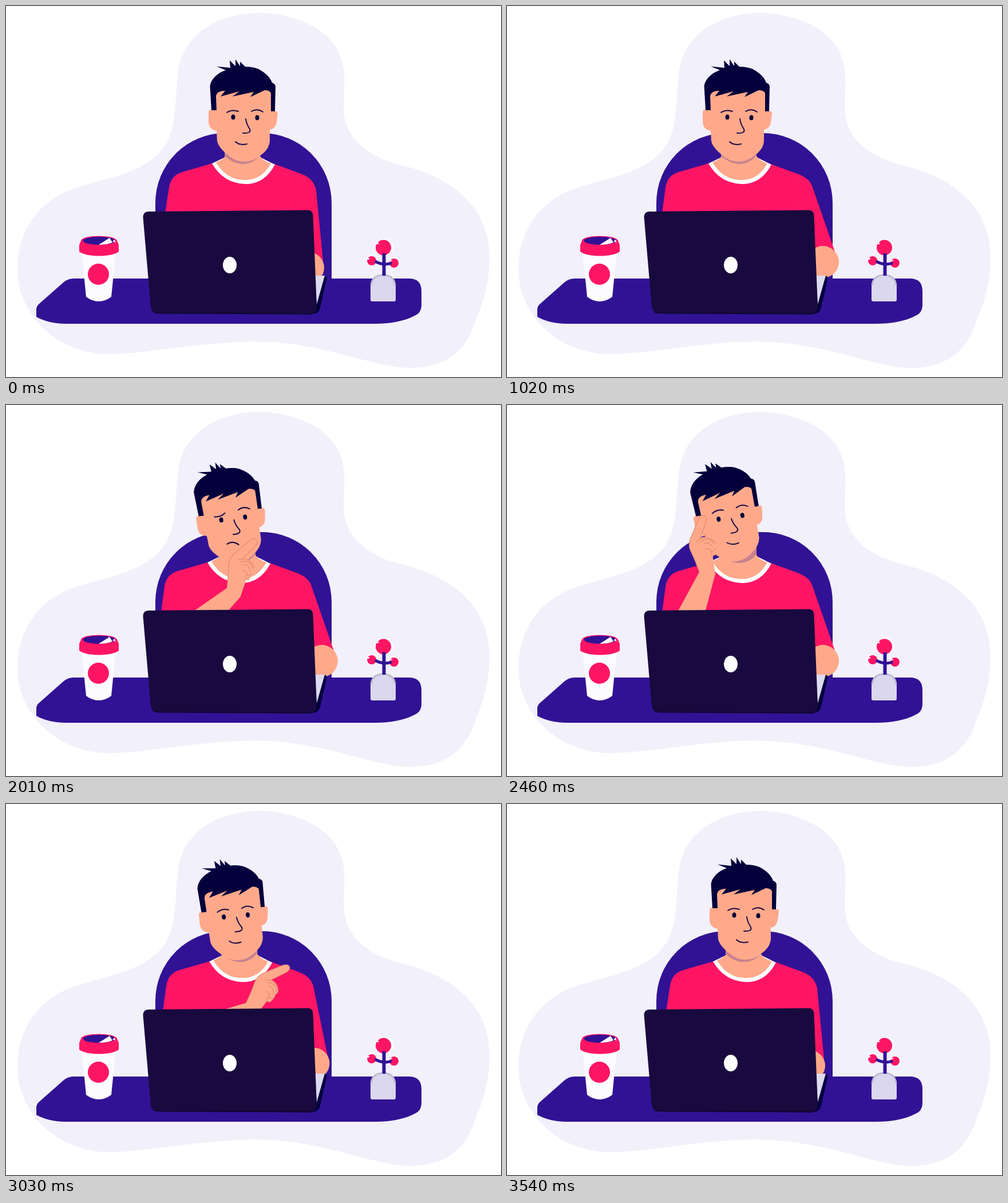
Recreate the animation shown at these times as an HTML page. Size 865x648 px, loop 4260 ms.

```html
<!DOCTYPE html>
<html lang="en">
<head>
<meta charset="utf-8">
<title>At the desk</title>
<style>
  html, body { margin: 0; width: 100%; height: 100%; overflow: hidden; background: #fff; }
  svg { display: block; width: 100vw; height: 100vh; }
  .skin { fill: #ffa98a; }
  .red { fill: #ff1564; }
  .violet { fill: #311294; }
  .hair { fill: #03003c; }
  .dark { fill: #180a3e; }
  .line { fill: none; stroke: #1b0a4a; stroke-width: 2; stroke-linecap: round; stroke-linejoin: round; }
  .crease { fill: none; stroke: #d98570; stroke-width: 1; stroke-linecap: round; }
</style>
</head>
<body>
<svg viewBox="0 0 865 648">
  <!-- backdrop -->
  <path fill="#f2f0fb" d="M444 12C500 12 560 38 580 78C597 112 590 140 590 180C592 230 630 263 690 278C770 296 845 345 845 440C845 480 834 520 822 545C805 605 765 632 708 632C640 632 560 588 440 586C340 586 250 608 180 608C90 608 20 540 20 460C20 390 60 335 130 315C190 298 230 290 262 262C300 228 294 180 300 120C306 50 370 12 444 12Z"/>
  <path class="violet" d="M261 480V344A122 122 0 0 1 383 222H447A122 122 0 0 1 569 344V480Z"/>
  <path class="violet" d="M53 530Q53 525 57 521L100 483Q108 476 118 476H704Q726 476 726 498V522Q726 536 714 541C695 551 670 555 645 555H105Q75 555 53 543Z"/>

  <!-- cup -->
  <path fill="#fcfbfe" d="M132 428L140 508Q162 524 184 508L192 428Z"/>
  <path class="red" d="M128 417L131 410C132 399 192 399 194 410L197 417V429C185 439 140 439 128 429Z"/>
  <ellipse class="violet" cx="162.500" cy="410" rx="28" ry="7"/>
  <path fill="#fff" d="M162 417L181 405L186 413Q177 417 162 417ZM186 411L190 408L191 413Z"/>
  <circle class="red" cx="161.500" cy="468.500" r="18.500"/>

  <!-- plant -->
  <path fill="#dad7ee" d="M637 513V491Q637 470 659 470T681 491V513Q681 516 678 516H640Q637 516 637 513Z"/>
  <path fill="none" stroke="#bfbbcf" stroke-width="3" d="M638 488Q640 470 659 470T680 488"/>
  <g fill="none" stroke="#fff" stroke-width="1.500">
    <circle cx="662" cy="421" r="14"/><circle cx="637" cy="444" r="7.500"/><circle cx="680" cy="448" r="7.500"/>
  </g>
  <g class="red">
    <circle cx="659.500" cy="422" r="13.500"/><circle cx="639" cy="445" r="8"/><circle cx="678" cy="449" r="8"/>
  </g>
  <path fill="#f2f0fb" d="M645 409L654 409L650 413L652 416L645 416ZM630 439L636 441L632 444ZM670 443L676 444L671 447Z"/>
  <path fill="none" stroke="#311294" stroke-width="6" d="M660.500 432V471"/>
  <path fill="none" stroke="#311294" stroke-width="5" d="M645 446Q660 454 674 449"/>

  <!-- person -->
  <path id="shirt" class="red"/>
  <circle id="elbow" class="skin"/>
  <g id="neck">
    <path fill="#fff" d="M360 275L383 264H444L470 277Q452 311 419 311Q380 310 360 275Z"/>
    <path class="skin" d="M383 240V262Q380 268 367 273Q385 304 418 304Q447 304 463 275Q448 270 444 262V240Z"/>
    <path fill="#c98190" d="M382 250V262Q398 276 414 276Q434 275 444 260V250Z"/>
  </g>
  <g id="head">
    <path class="skin" d="M362 140V181Q354 180 354 186V203Q355 216 368 218L369 236Q371 246 385 258Q400 272 416 272Q433 272 446 260Q460 250 461 236V216Q471 215 473 203L475 188Q475 182 467 184V140Z"/>
    <path class="hair" d="M359 182L356.500 140C358 128 369 117 384 112L368 105.500L392 108L391 95L401 105V93L409 105V97L418 106Q431 106 441 110Q460 120 465 134Q471 136 471 141L470 184H463V152Q460 147 452 147L427 159L433 150L396 158L408 149L375 158L383 148Q368 148 367 158L368 182Z"/>
    <g class="hair"><ellipse cx="397" cy="194" rx="3.500" ry="4.500"/><ellipse cx="439" cy="195" rx="3.500" ry="4.500"/></g>
    <path class="line" d="M419 197Q420 206 426 215Q429 223 414 222"/>
    <path id="brows" class="line"/>
    <path id="mouth" class="line"/>
  </g>
  <g id="arm">
    <path class="skin" d="M275 404L334 291Q327 272 317 252Q314 245 317 234L331 199Q336 190 342 193Q346 196 344 204L336 231Q347 227 355 234Q361 238 359 244Q363 250 362 258Q362 262 357 263L362 294L330 422Z"/>
    <path class="crease" d="M334 291Q327 272 317 252Q314 245 317 234L331 199Q336 190 342 193Q346 196 344 204L334 234M328 239Q341 226 355 234Q361 238 359 241M333 240Q343 231 353 235L358 240M340 243Q347 236 356 246M344 251Q354 248 354 256Q354 262 358 262L362 260M355 256Q360 254 361 249"/>
  </g>

  <!-- laptop -->
  <path class="hair" d="M539 471H556Q562 472 560 478L549 527Q546 538 535 538H500Z"/>
  <path fill="#dedaf0" d="M538 471H557L543 521Z"/>
  <path class="dark" d="M249 359L527 356.500Q536 356.500 536.500 366L543 524Q543 537 532 538L265 536.500Q254 536 253 526L239.500 369Q239.500 359 249 359Z"/>
  <path fill="none" stroke="#0c0528" stroke-width="1.500" d="M258 535L266 536.500L535 538"/>
  <ellipse fill="#fff" cx="391" cy="452.500" rx="12" ry="14.500"/>
</svg>
<script>
const LOOP = 4260;
const $ = id => document.getElementById(id);
const smooth = p => p * p * (3 - 2 * p);
const out = p => 1 - (1 - p) ** 3;
const outSoft = p => 1 - (1 - p) ** 2;
const mix = (a, b, p) => a + (b - a) * p;

// Each track: rest values, then moves [start, end, easing, values].
const tracks = {
  head: [[0, 0, 0], [0, 810, out, [-12, 0, 0]], [1200, 1680, smooth, [-22.5, 4.5, -8.3]],
         [2220, 2580, out, [-29.5, 2.5, -10.5]], [2730, 3420, smooth, [0, 0, 0]]],
  // frown, brow lift
  face: [[0, 0], [1260, 1560, smooth, [1, 0]], [2220, 2520, out, [0, 1]], [2730, 3240, smooth, [0, 0]]],
  body: [[0], [0, 810, out, [1]], [2730, 3420, smooth, [0]]],
  elbow: [[0], [0, 660, smooth, [1]], [1200, 1620, smooth, [.9]], [1740, 2070, smooth, [1]],
          [2730, 3540, outSoft, [0]]],
  // turn about the raised arm's elbow, then offset
  arm: [[92, 0, 0], [1200, 1650, out, [27.5, 0, 0]], [2220, 2580, out, [0, 0, 0]],
        [2730, 3330, smooth, [92, 16, -8]]]
};

function at([rest, ...moves], t) {
  return moves.reduce((v, [start, end, ease, goal]) => {
    const p = ease(Math.min(1, Math.max(0, (t - start) / (end - start))));
    return v.map((a, i) => mix(a, goal[i], p));
  }, rest);
}

function draw(t) {
  const [hx, hy, turn] = at(tracks.head, t);
  const [frown, lift] = at(tracks.face, t);
  const [b] = at(tracks.body, t);
  const [e] = at(tracks.elbow, t);
  const [swing, ax, ay] = at(tracks.arm, t);
  const s = -8 * b;

  $('head').setAttribute('transform', `translate(${hx} ${hy}) rotate(${turn} 414 184)`);
  $('neck').setAttribute('transform', `translate(${s} 0)`);
  $('arm').setAttribute('transform', `translate(${ax} ${ay}) rotate(${swing} 302 412)`);

  $('shirt').setAttribute('d', `M${360 + s} 275L${308 + s} 290Q${288 + s} 296 ${285 + s} 317
    L${278 - 7 * b} 362L290 450H535L${554 + 20 * e} ${445 - 13 * e}L${542 + s} ${322 - 5 * b}
    Q${538 + s} 302 ${518 + s} 294L${469 + s} 276Z`);
  $('elbow').setAttribute('cx', 529 + 23 * e);
  $('elbow').setAttribute('cy', 457 - 10 * e);
  $('elbow').setAttribute('r', 27 + e);

  const up = 4 * lift, side = 2 * lift, right = up + 3 * frown;
  $('brows').setAttribute('d', `M${386 + side} ${186 - up + frown}
    Q${395 + side + 2 * frown} ${180 - up + 9 * frown} ${406 + side - frown} ${184 - up - frown}
    M${429 + side} ${184 - right}Q${439 + side} ${178 - right} ${449 + side} ${185 - right}`);
  $('mouth').setAttribute('d', `M${401 + 3 * lift} 237
    Q${408 + 4 * lift + 3 * frown} ${244 - 12 * frown} ${421 + 3 * lift} 241`);
}

function frame(now) {
  draw(now % LOOP);
  requestAnimationFrame(frame);
}
draw(0);
requestAnimationFrame(frame);
</script>
</body>
</html>
```
